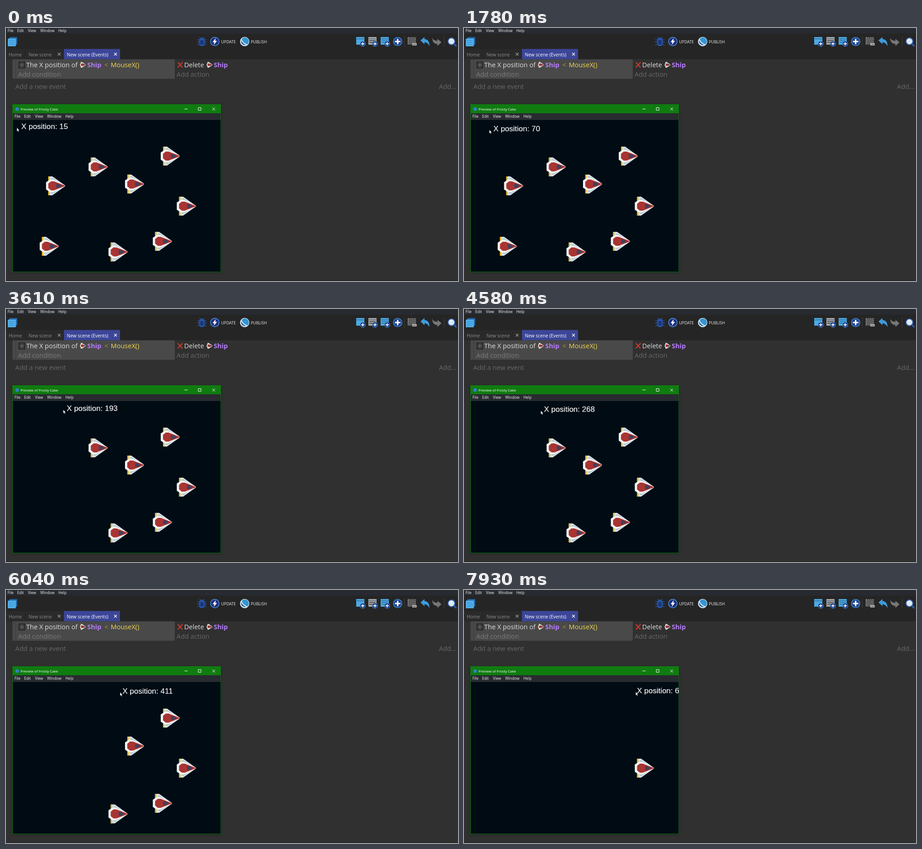
An HTML page that plays this animation: 999 by 561 pixels, repeating every 8000 ms.

```html
<!DOCTYPE html>
<html lang="en">
<head>
<meta charset="utf-8">
<title>Event editor with preview</title>
<style>
  html, body { margin: 0; width: 100%; height: 100%; overflow: hidden; background: #303030; }
  svg { display: block; width: 100%; height: 100%; }
  text { font-family: "Open Sans", "Noto Sans", sans-serif; white-space: pre; }
  .menu text { font-size: 8.35px; fill: #f4f4f4; }
  .tool { font-size: 8.75px; fill: #f0f0f0; }
  .tab { font-size: 10.25px; fill: #8d8d8d; }
  .event text { font-size: 14.55px; fill: #dedede; }
  .event .hint { fill: #7b7b7b; }
  .event .dim { fill: #686868; }
  .event .object { font-weight: 700; fill: #b47cfa; }
  .title { font-size: 7.95px; fill: #fff; }
  #label { font: 17px "Liberation Sans", Arial, sans-serif; fill: #f5f5f5; stroke: #f5f5f5; stroke-width: .2; }
  .line { fill: none; stroke: #fff; }
</style>
</head>
<body>
<svg viewBox="0 0 999 561">
  <defs>
    <g id="ship">
      <path fill="#d3e1e8" d="M5 0H14L42 20V22L14 42H5Z"/>
      <path fill="#b7c9d3" d="M10 6 14 3 32 16ZM10 36 14 39 32 26Z"/>
      <path fill="#f0b811" d="M5 0H8V42H5Z"/>
      <path fill="#f3f3f1" d="M0 13 9 7H16L42 20V22L16 35H9L0 29Z"/>
      <path fill="#a93432" d="M5 16 11 11H17.5L42 20.4V21.6L17.5 31H11L5 26Z"/>
      <path fill="#443f5b" d="M22.5 16.5H27.5L34 20V22L27.5 25.5H22.5Z"/>
    </g>
    <g id="plus">
      <circle r="5.8" fill="#1d3b86" stroke="#4b9ddd"/>
      <path class="line" stroke-width="1.8" d="M-3.5 0H3.5M0-3.5V3.5"/>
    </g>
    <g id="panel">
      <path d="M0 0H18V17H0Z"/>
      <path fill="#173c67" opacity=".65" d="M1 3.5H17V4.8H1Z"/>
    </g>
    <path id="close" d="M-3-3 3 3M3-3-3 3"/>
    <clipPath id="game"><path d="M15 204H475V540.5H15Z"/></clipPath>
  </defs>

  <path fill="#303030" d="M0 0H999V561H0Z"/>
  <path fill="#252525" d="M0 0H999V69.5H0Z"/>
  <path fill="#272a30" d="M0 0H999V12.5H0Z"/>
  <path fill="#202020" d="M0 560H999V561H0Z"/>
  <g class="menu">
    <text x="3.5" y="9">File</text><text x="24.7" y="9">Edit</text><text x="48.5" y="9">View</text>
    <text x="75.7" y="9">Window</text><text x="115.7" y="9">Help</text>
  </g>

  <!-- toolbar -->
  <path fill="#1e5c9a" d="M8 20H25V36H8Z"/>
  <path fill="#2f7fc4" d="M6 22H23V38H6Z"/>
  <path fill="#54b2ea" d="M4 24H21.5V40.5H4Z"/>
  <path stroke="#2f7fc4" stroke-width="1.2" d="M6 28H19.5M6 32H19.5M6 36H19.5"/>

  <path fill="none" stroke="#2f5db4" stroke-width="1.3" d="M423 25.5 427 27M443 25.5 439 27M422.5 31H443.5M423 38 427 35.5M443 38 439 35.5M428 20 430 23M438 20 436 23"/>
  <path fill="#2453a8" d="M427 25 430 21.5H436L439 25V37L436 40H430L427 37Z"/>
  <path fill="#1a3576" d="M429.5 27H436.5V36.5H429.5Z"/>

  <circle cx="461.5" cy="30" r="9.5" fill="#1f2f80" stroke="#4f9be0" stroke-width="1.4"/>
  <path fill="#fff" d="M463.5 22.5 456.5 31.5H460.5L459 37.5 466.5 28.5H462.5Z"/>
  <text class="tool" x="475.5" y="33.5">UPDATE</text>
  <circle cx="527.5" cy="30" r="10.3" fill="#e9f3fa"/>
  <circle cx="527.8" cy="29.8" r="9" fill="#3595d2"/>
  <path fill="#e9f3fa" d="M520.5 23.5Q523 33 534.5 37Q529 40.5 523 37.5Q516.5 33 520.5 23.5Z"/>
  <path fill="#1b5fa5" d="M520 27Q522.5 34.5 531 37.5Q525.5 39 522 35.5Q518.5 32 520 27Z"/>
  <text class="tool" x="541" y="33.5">PUBLISH</text>

  <use href="#panel" x="774" y="20" fill="#4ba9e2"/><use href="#plus" x="788.5" y="35"/>
  <use href="#panel" x="801" y="20" fill="#a5a5a5"/>
  <path stroke="#3a3a3a" stroke-width="1.5" d="M803 28H817M803 32H813"/><use href="#plus" x="815.5" y="35"/>
  <use href="#panel" x="828" y="20" fill="#4ba9e2"/>
  <path stroke="#1c4f86" stroke-width="1.2" d="M830 28H844M830 32H840"/><use href="#plus" x="842.5" y="35"/>
  <circle cx="865.7" cy="30" r="9.4" fill="#1f438f" stroke="#4797da" stroke-width="1.4"/>
  <path class="line" stroke-width="3" d="M859.7 30H871.7M865.7 24V36"/>
  <path stroke="#3c3c3c" d="M880.5 18V42M968.5 18V42"/>
  <path fill="#5c5c5c" d="M889 22H904V35H889Z"/>
  <path fill="none" stroke="#c8c8c8" stroke-width="1.2" stroke-dasharray="2.5 1.5" d="M888.5 21H905V36H888.5Z"/>
  <path fill="#d0d0d0" d="M898 33.5H907.5V38.5H898Z"/>
  <path stroke="#333" stroke-width="1.4" d="M899.5 36H906"/>
  <path fill="#3f9bdb" d="M916 27.5 925 20V24.5Q936 25 936 40Q932 32 925 31.5V36Z"/>
  <path fill="#777" d="M962.5 31.5 953.5 24V28.5Q943 28 942 21Q942 35 953.5 35.5V40Z"/>
  <path stroke="#2b59a8" stroke-width="3.5" stroke-linecap="round" d="M990 35 994.5 39.5"/>
  <circle cx="984.5" cy="29.5" r="7.5" fill="#dceaf5" stroke="#3a64b4" stroke-width="2"/>
  <path class="line" stroke-width="1.5" d="M980 28Q981 25 985 25"/>

  <!-- tabs -->
  <path fill="#2a2a2a" d="M0 46.5H42V69.5H0ZM43 46.5H127V69.5H43Z"/>
  <path fill="#3c4698" d="M128 46.5H252V69.5H128Z"/>
  <text class="tab" x="6" y="62.5">Home</text>
  <text class="tab" x="49.7" y="62.5">New scene</text>
  <text class="tab" x="134.5" y="62.5" style="fill:#fff">New scene (Events)</text>
  <use href="#close" x="117.5" y="58" stroke="#a0a0a0" stroke-width="1.2"/>
  <use href="#close" x="242" y="58" stroke="#fff" stroke-width="1.3"/>

  <!-- event sheet -->
  <path fill="#494949" d="M14.5 69.5H373V112.5H14.5Z"/>
  <path stroke="#383838" d="M21.5 69.5V112.5"/>
  <path fill="#3b3b3b" stroke="#141414" stroke-width="1.2" d="M28.5 75H41.5V89H28.5Z"/>
  <path stroke="#777" d="M30 82H40M35 76.5V87.5"/>
  <path stroke="#c93a2b" stroke-width="2.4" d="M380 76 390 87.5M390.5 76 379.5 87.5"/>
  <use href="#ship" transform="translate(163.8 75.3) scale(.3)"/>
  <use href="#ship" transform="translate(443.8 75.3) scale(.3)"/>
  <g class="event">
    <text x="44.7" y="87">The X position of</text>
    <text class="object" x="179.5" y="87">Ship</text>
    <text x="217.5" y="87" style="fill:#b8982f">&lt;</text>
    <text x="231.5" y="87" style="fill:#f0d64e">MouseX()</text>
    <text class="hint" x="27" y="108">Add condition</text>
    <text x="393.7" y="87">Delete</text>
    <text class="object" x="459" y="87">Ship</text>
    <text class="dim" x="377" y="107.5">Add action</text>
    <text class="dim" x="20.5" y="134.5">Add a new event</text>
    <text class="dim" x="957" y="134.5">Add...</text>
  </g>

  <!-- preview window -->
  <path fill="#107c10" style="filter:drop-shadow(0 1px 2px #0005)" d="M14 169H475V541.5H14Z"/>
  <path fill="#282b30" d="M15 189H474.3V204.5H15Z"/>
  <path fill="#000b14" d="M15 204H474.3V540.5H15Z"/>
  <circle cx="24.5" cy="179.7" r="4" fill="#2d7fc6"/>
  <text class="title" x="32.2" y="182.6">Preview of Frosty Cake</text>
  <path class="line" d="M394.5 179.5H401.5M425 176.5H431V182.5H425Z"/>
  <use href="#close" x="459" y="179.7" stroke="#fff"/>
  <g class="menu">
    <text x="18.7" y="199.2">File</text><text x="40" y="199.2">Edit</text><text x="64" y="199.2">View</text>
    <text x="91" y="199.2">Window</text><text x="131.2" y="199.2">Help</text>
  </g>
  <g clip-path="url(#game)">
    <g id="fleet"></g>
    <text id="label"></text>
    <path id="cursor" fill="#fff" stroke="#000" stroke-width=".4" d="M0 0V8L1.9 6.3 3.2 9.2 4.6 8.6 3.3 5.8H5.6Z"/>
  </g>
</svg>
<script>
  const LOOP = 8000, START = 645, TICK = 70;

  // [tick, mouse X in the game, pointer height on the stage]
  const path = [
    [-1, 15, 221.2], [7, 32, 223.3], [11, 47, 224.2], [23, 103, 228], [26, 113, 228.5],
    [35, 149, 225.7], [42, 193, 223.5], [47, 215, 222.3], [56, 268, 225.5], [59, 284, 226],
    [71, 350, 227], [77, 411, 226.8], [83, 447, 227], [95, 535, 227], [104, 632, 225.8]
  ];
  const shipSpots = [
    [74.5, 463], [88.5, 329], [182.5, 287], [226.5, 475.5],
    [263, 325], [324.5, 452], [342, 263], [377.5, 374]
  ];
  const HIT_OFFSET = 25.7;

  const byId = id => document.getElementById(id);
  const label = byId("label"), cursor = byId("cursor");

  const ships = shipSpots.map(([x, y]) => {
    const node = document.createElementNS("http://www.w3.org/2000/svg", "use");
    node.setAttribute("href", "#ship");
    node.setAttribute("x", x);
    node.setAttribute("y", y);
    byId("fleet").append(node);
    return { x, node };
  });

  function mouseAt(tick) {
    const next = path.findIndex(key => key[0] > tick);
    if (next < 0) return path.at(-1).slice(1);
    const a = path[next - 1], b = path[next];
    const part = (tick - a[0]) / (b[0] - a[0]);
    return [1, 2].map(i => a[i] + (b[i] - a[i]) * part);
  }

  function draw(now) {
    const tick = Math.max(-1, Math.floor((now % LOOP - START) / TICK));
    const [mouseX, y] = mouseAt(tick);
    const pointerX = 15.4 + 0.576 * mouseX;

    cursor.setAttribute("transform", `translate(${pointerX} ${y})`);
    label.setAttribute("x", 25.4 + 0.5645 * mouseX);
    label.setAttribute("y", y + 2.9);
    label.textContent = "X position: " + Math.round(mouseX);
    for (const { x, node } of ships) {
      node.style.display = pointerX > x + HIT_OFFSET ? "none" : "";
    }
  }

  const origin = performance.now();
  function loop() {
    draw(performance.now() - origin);
    requestAnimationFrame(loop);
  }
  loop();
</script>
</body>
</html>
```
